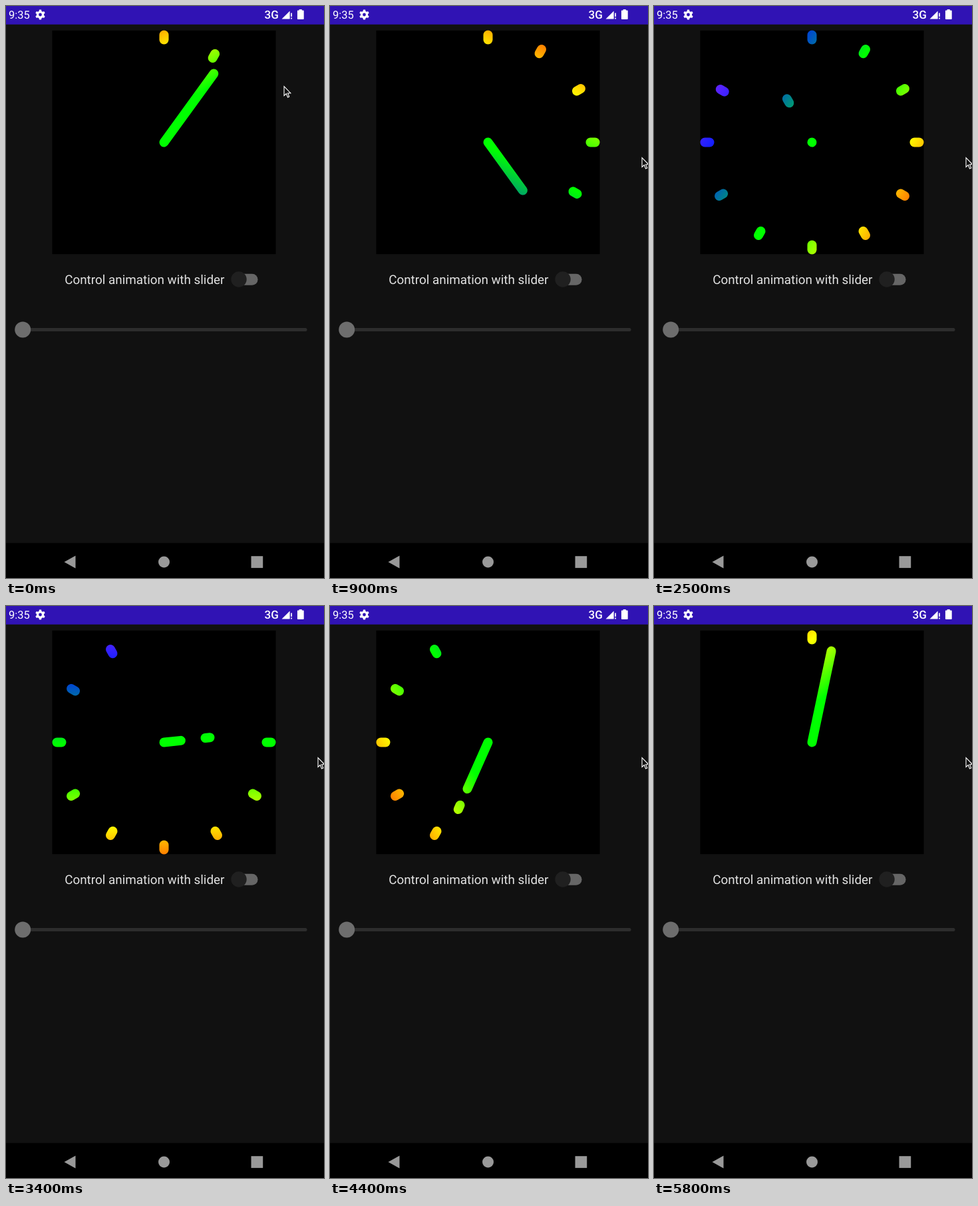
An HTML page with a canvas that plays this animation: 478 px wide and 858 px high, repeating every 5.9 s.

```html
<!DOCTYPE html>
<html lang="en">
<head>
<meta charset="utf-8">
<title>Clock loader</title>
<style>
  html, body { margin: 0; width: 100%; height: 100%; overflow: hidden; background: #111; }
  svg, canvas { position: absolute; left: 0; top: 0; width: 478px; height: 858px; }
  text { font-family: Roboto, "Open Sans", sans-serif; text-rendering: geometricPrecision; }
</style>
</head>
<body>
<svg viewBox="0 0 478 858">
  <rect width="478" height="858" fill="#111"/>
  <rect width="478" height="27.7" fill="#3013b4"/>
  <g fill="#fff">
    <text x="4" y="19" font-size="16.5">9:35</text>
    <text x="388.6" y="18.7" font-size="17" font-weight="500">3G</text>
    <g id="gear" transform="translate(51.5 13)">
      <circle r="4" fill="none" stroke="#fff" stroke-width="3.2"/>
    </g>
    <path d="M414.5 19.5L426.6 7.4V19.5Z"/>
    <path d="M428.2 10.5h1.7v5.6h-1.7zM428.2 17.6h1.7v1.9h-1.7z"/>
    <path d="M440.7 5h4v1.6h2q1 0 1 1V19q0 1-1 1h-7.8q-1 0-1-1V7.6q0-1 1-1h1.8z"/>
  </g>
  <rect x="69.5" y="36.8" width="336" height="335.4" fill="#000"/>
  <text x="88.2" y="417" font-size="18.85" fill="#e2e2e2">Control animation with slider</text>
  <rect x="342" y="401.7" width="36.5" height="17" rx="8.5" fill="#666"/>
  <circle cx="350" cy="410" r="11.7" fill="#202020"/>
  <path d="M25 485.500H450" stroke="#2d2d2d" stroke-width="5" stroke-linecap="round"/>
  <circle cx="25.2" cy="485.5" r="12" fill="#6d6d6d"/>
  <rect y="805.5" width="478" height="52.5" fill="#000"/>
  <g fill="#999">
    <path d="M87.500 834L104.500 824.600V843.400Z"/>
    <circle cx="237.5" cy="834" r="8.500"/>
    <rect x="368.500" y="825.200" width="17.700" height="17.700"/>
  </g>
</svg>
<canvas id="clock" width="478" height="858"></canvas>
<svg viewBox="0 0 478 858">
  <path id="cursor" d="M0 .5V14.500L3.300 11.500L5.500 17L7.700 16L5.500 10.700H9.800Z" fill="#111" stroke="#fff" stroke-width="1.100"/>
</svg>
<script>
  const LOOP = 5900, STEP = 100, HOUR = 250, SETTLE = 360;
  const CX = 237.5, CY = 204.5, UNIT = 14, REACH = 168;
  const GROW = 10 * UNIT / 11;
  const REST = 11.25 * UNIT;
  const RAD = Math.PI / 180;

  // Colour stops by distance along the turning axis
  const stops = [
    [-168, '#6424ff'], [-113, '#001eff'], [-5, '#00ff00'],
    [42, '#00ff00'], [120, '#ffff00'], [168, '#ff8000']
  ];
  // time, x, y
  const cursorPath = [[0, 418, 120], [300, 455, 386], [600, 472, 270], [700, 469, 227], [LOOP, 469, 227]];

  const ctx = document.getElementById('clock').getContext('2d');
  const cursor = document.getElementById('cursor');

  const gear = document.getElementById('gear');
  for (let i = 0; i < 6; i++) {
    const tooth = document.createElementNS('http://www.w3.org/2000/svg', 'path');
    tooth.setAttribute('d', 'M-2.1 -4.5L-1.5 -7.4H1.5L2.1 -4.5Z');
    tooth.setAttribute('transform', `rotate(${i * 60})`);
    gear.append(tooth);
  }

  // cubic-bezier(0, 0, 0.2, 1)
  function slowIn(x) {
    if (x >= 1) return 1;
    let lo = 0, hi = 1;
    for (let i = 0; i < 24; i++) {
      const s = (lo + hi) / 2;
      if (0.6 * s * s + 0.4 * s * s * s < x) lo = s; else hi = s;
    }
    return 3 * lo * lo - 2 * lo * lo * lo;
  }

  function point(angle, r) {
    return [CX + r * Math.sin(angle * RAD), CY - r * Math.cos(angle * RAD)];
  }

  function bar(angle, from, to) {
    ctx.beginPath();
    ctx.moveTo(...point(angle, from));
    ctx.lineTo(...point(angle, to + 0.01));
    ctx.stroke();
  }

  function dot(angle, r) {
    bar(angle, r - UNIT / 4, r + UNIT / 4);
  }

  function setBrush(angle) {
    const g = ctx.createLinearGradient(...point(angle, -REACH), ...point(angle, REACH));
    for (const [u, color] of stops) g.addColorStop((u + REACH) / (2 * REACH), color);
    ctx.strokeStyle = g;
    ctx.lineWidth = UNIT;
    ctx.lineCap = 'round';
  }

  function drawClock(t) {
    const turn = 36 + t * 0.12;
    const angle = turn % 720;
    const hour = Math.floor(angle / 30);
    const elapsed = angle / 0.12;
    ctx.clearRect(0, 0, 478, 858);
    setBrush(turn / 2 - 45);
    bar(angle, 0, GROW * (hour < 12 ? 11 - hour : hour - 12));
    for (let k = 0; k < 12; k++) {
      if (k > hour || k < hour - 12) continue;
      if (k === hour - 12) {
        const p = angle % 30 / 30;
        dot(angle, REST - GROW * (11 - k) * p);
      } else {
        const p = slowIn((elapsed - k * HOUR) / SETTLE);
        dot(k * 30, REST - GROW * k * (1 - p));
      }
    }
  }

  function moveCursor(t) {
    const i = cursorPath.findIndex(p => p[0] > t);
    const [t0, x0, y0] = cursorPath[i - 1], [t1, x1, y1] = cursorPath[i];
    const p = (t - t0) / (t1 - t0);
    cursor.setAttribute('transform', `translate(${x0 + (x1 - x0) * p} ${y0 + (y1 - y0) * p})`);
  }

  function frame() {
    const t = Math.floor(performance.now() % LOOP / STEP) * STEP;
    drawClock(t);
    moveCursor(t);
    requestAnimationFrame(frame);
  }
  frame();
</script>
</body>
</html>
```
